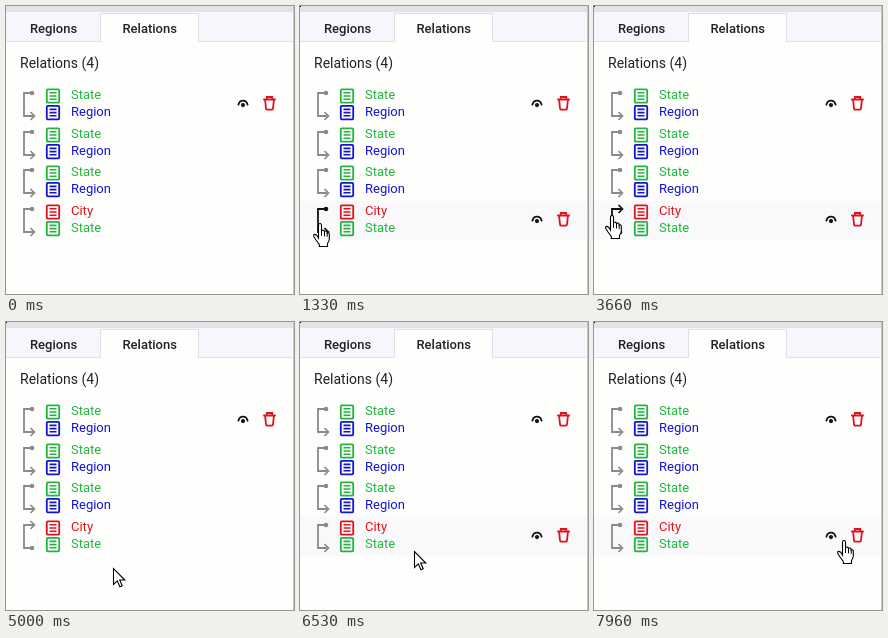
An HTML page with a canvas that plays this animation: 288 px wide and 288 px high, repeating every 8000 ms.

```html
<!DOCTYPE html>
<html lang="en">
<head>
<meta charset="utf-8">
<title>Relations panel</title>
<style>
html, body { margin: 0; width: 100%; height: 100%; overflow: hidden; background: #fefefd; }
canvas { display: block; width: 288px; height: 288px; }
</style>
</head>
<body>
<canvas id="stage" width="288" height="288"></canvas>
<script>
const ctx = document.getElementById('stage').getContext('2d');
const LOOP = 8000;
const FONT = 'Roboto, sans-serif';
const GREEN = '#21b53f', BLUE = '#1414cf', RED = '#e0131c', INK = '#222', GRAY = '#8a8a8a';

const PITCH = 116 / 3;
const state = ['State', GREEN], region = ['Region', BLUE], city = ['City', RED];
const rows = [[state, region], [state, region], [state, region], [city, state]];

// Pointer path: time, x, y of the hot spot
const path = [
  [430, 2, 3], [1060, 19, 217],
  [2000, 19, 217], [2330, 48, 242],
  [2500, 48, 242], [3060, 17, 209],
  [3900, 17, 209], [4200, 107, 246],
  [5000, 107, 246], [5600, 20, 214],
  [6460, 20, 214], [6530, 114, 229], [6760, 118, 235],
  [7000, 118, 235], [7160, 104, 212],
  [7860, 104, 212], [7960, 249, 218]
];

const ease = u => u * u * (3 - 2 * u);

function pointerAt(t) {
  if (t < path[0][0]) return null;
  const i = path.findIndex(k => k[0] > t);
  if (i < 0) return path[path.length - 1].slice(1);
  const [t0, x0, y0] = path[i - 1], [t1, x1, y1] = path[i];
  const u = ease((t - t0) / (t1 - t0));
  return [x0 + (x1 - x0) * u, y0 + (y1 - y0) * u];
}

function directionAt(t) {
  if (t < 1600) return 'right';
  if (t < 3660) return 'both';
  return t < 6000 ? 'left' : 'right';
}

function rect(x, y, w, h, color) {
  ctx.fillStyle = color;
  ctx.fillRect(x, y, w, h);
}

function text(str, x, y, size, color, weight = 400) {
  ctx.font = `${weight} ${size}px ${FONT}`;
  ctx.fillStyle = color;
  ctx.fillText(str, x, y);
}

function stroke(d, color, width) {
  ctx.strokeStyle = color;
  ctx.lineWidth = width;
  ctx.stroke(new Path2D(d));
}

function dot(x, y, r, color) {
  ctx.fillStyle = color;
  ctx.beginPath();
  ctx.arc(x, y, r, 0, 7);
  ctx.fill();
}

function at(x, y, draw) {
  ctx.save();
  ctx.translate(x, y);
  draw();
  ctx.restore();
}

function drawHeader() {
  rect(0, 0, 288, 288, '#fefefd');
  rect(0, 0, 288, 6, '#e4e2e4');
  rect(0, 6, 288, 30, '#f6f6fc');
  rect(0, 35, 288, 1, '#e2e2e6');
  rect(94, 7, 99, 29, '#dfe1e6');
  rect(95, 8, 97, 29, '#fefefd');
  text('Regions', 24, 27, 13, INK, 500);
  text('Relations', 116.5, 27, 13, INK, 500);
  text('Relations (4)', 14, 62, 14, INK);
}

function drawDoc(cy, color) {
  at(47, cy, () => {
    ctx.lineCap = 'butt';
    ctx.strokeStyle = color;
    ctx.lineWidth = 1.8;
    ctx.beginPath();
    ctx.roundRect(-6.2, -6.7, 12.4, 13.4, 1);
    ctx.stroke();
    stroke('M-3.5 -3.2H3.5M-3.5 0H3.5M-3.5 3.2H3.5', color, 1.6);
  });
}

function drawEnd(y, isArrow, color) {
  if (isArrow) stroke(`M24.5 ${y - 4}L28.5 ${y}L24.5 ${y + 4}`, color, 1.7);
  else dot(26, y, 2.3, color);
}

function drawLink(y, dir, color) {
  ctx.lineCap = 'butt';
  stroke(`M27 ${y}H18V${y + 23}H27`, color, 1.8);
  drawEnd(y, dir !== 'right', color);
  drawEnd(y + 23, dir !== 'left', color);
}

function drawButtons(y) {
  ctx.lineCap = 'round';
  at(237, y, () => {
    stroke('M-4.6 1.2C-3.4 -4.2 3.4 -4.2 4.6 1.2', '#111', 1.8);
    dot(0, 1.6, 2.1, '#111');
  });
  at(263.5, y, () => {
    stroke('M-5.6 -4H5.6M-2.7 -4.5V-6.5H2.7V-4.5M-4.4 -3.5L-3.5 5Q-3.3 6.2 -2 6.2H2Q3.3 6.2 3.5 5L4.4 -3.5', RED, 1.8);
  });
}

function drawRow(i, hover, iconHover, dir) {
  const top = 79 + Math.round(i * PITCH), shift = top - 79;
  if (hover) rect(0, top, 287, 39, '#f9f9fc');
  drawLink(87 + shift, dir, iconHover ? '#111' : GRAY);
  rows[i].forEach(([label, color], j) => {
    drawDoc(90 + shift + j * 16.6, color);
    text(label, 65, 93 + shift + j * 17, 13, color);
  });
  if (hover || i === 0) drawButtons(97.5 + shift);
}

const arrowShape = new Path2D('M.5 .5V16.5L4.3 12.9L6.9 18.7L9.2 17.7L6.7 12H11.8Z');
const handShape = new Path2D(
  'M5.5 15V2Q5.5 .5 7 .5T8.5 2V8.5Q8.7 7 10 7T11.5 9Q11.7 7.8 13 8T14.2 10' +
  'Q16.3 9 16.3 11.5V16Q16.3 18 14.5 20.5V23.5H6.3V21.5L3 17L.8 13.5Q.2 11.6 1.8 11.4Q3.5 11.3 5.5 15Z');
const handLines = 'M8.5 8V12.5M11.5 9V13M14.2 10V13.5';

function drawPointer(x, y, isHand) {
  at(Math.round(x) - (isHand ? 6 : 0), Math.round(y), () => {
    const shape = isHand ? handShape : arrowShape;
    ctx.fillStyle = '#fff';
    ctx.fill(shape);
    ctx.strokeStyle = '#000';
    ctx.lineWidth = 1.1;
    ctx.stroke(shape);
    if (isHand) stroke(handLines, '#000', 1);
  });
}

function draw(t) {
  const pointer = pointerAt(t);
  const [x, y] = pointer || [-99, -99];
  const hovered = Math.floor((y - 79) / PITCH);
  const inRow = hovered >= 0 && hovered < rows.length;
  const onLink = inRow && x > 12 && x < 32;
  const onButton = inRow && x > 224 && x < 276;

  drawHeader();
  rows.forEach((_, i) => {
    const hover = i === hovered;
    drawRow(i, hover, hover && onLink, i === 3 ? directionAt(t) : 'right');
  });
  rect(287, 0, 1, 288, '#c9c9cb');
  if (t >= 30) rect(0, 0, 1, 1, '#000');
  if (pointer) drawPointer(x, y, onLink || onButton);
}

const start = performance.now();
function tick() {
  draw((performance.now() - start) % LOOP);
  requestAnimationFrame(tick);
}
tick();
</script>
</body>
</html>
```
